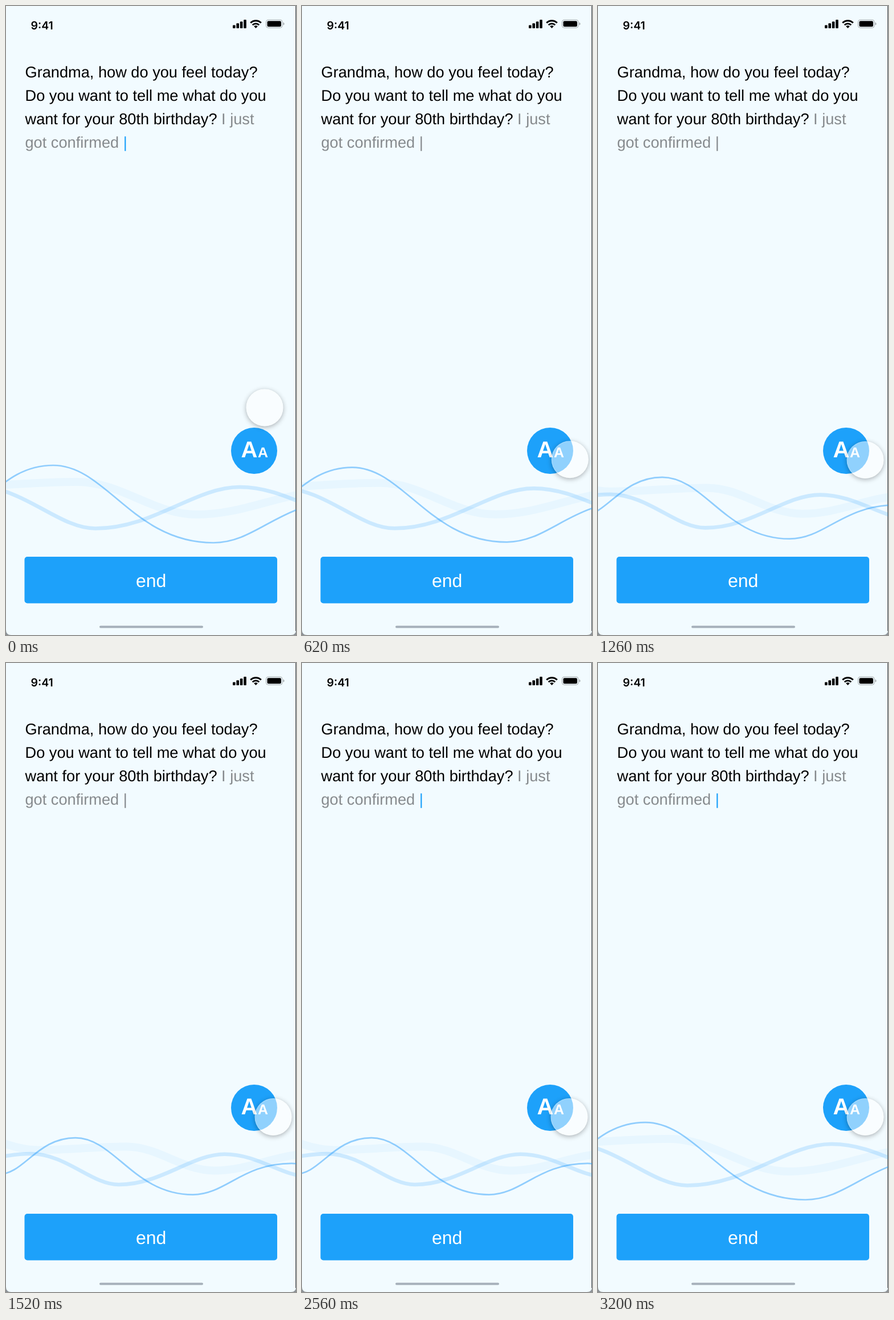
Write an HTML page that moves like this. It is 509x1101 px and loops after 3220 ms.

```html
<!DOCTYPE html>
<html lang="en">
<head>
<meta charset="utf-8">
<style>
html, body { margin: 0; width: 100%; height: 100%; overflow: hidden; background: #8b9196; }
svg { position: absolute; left: 0; top: 0; display: block; text-rendering: geometricPrecision; }
text { font-family: "Liberation Sans", Arial, sans-serif; }
#copy { font-size: 27.2px; }
.soft { fill: #868a8d; }
#clock { font: 600 19.5px Inter, sans-serif; }
#size { font-weight: 700; fill: #fff; text-anchor: middle; }
#waves path { fill: none; stroke: #1e96fb; vector-effect: non-scaling-stroke; }
#touch {
  position: absolute; left: -32.5px; top: -32.5px; width: 65px; height: 65px;
  box-sizing: border-box; border-radius: 50%;
  background: rgba(255,255,255,.51); border: 1px solid rgba(255,255,255,.25);
  box-shadow: 0 2px 8px rgba(0,0,0,.3);
}
</style>
</head>
<body>
<svg width="509" height="1101" viewBox="0 0 509 1101">
  <path fill="#f2fbff" d="M0 0H509V1092Q509 1101 500 1101H9Q0 1101 0 1092Z"/>
  <path fill="#4c5154" d="M508 0h1v1094h-1z"/>

  <text id="clock" x="43.5" y="41">9:41</text>
  <g id="signal"></g>
  <g fill="none" stroke="#000" stroke-width="2.8">
    <path d="M429.2 29.6a13.2 13.2 0 0 1 18.6 0"/>
    <path d="M432.7 33.3a8.2 8.2 0 0 1 11.6 0"/>
  </g>
  <path d="M438.5 39l-3.3-3.4a4.7 4.7 0 0 1 6.6 0z"/>
  <rect x="456.5" y="24.2" width="28.5" height="14" rx="3.8" fill="none" stroke="#a2a8ab"/>
  <rect x="458.5" y="26.2" width="24.5" height="10" rx="2.2"/>
  <path fill="#a2a8ab" d="M486.5 28.6q2 .8 2 2.6t-2 2.6z"/>

  <g id="copy">
    <text>Grandma, how do you feel today?</text>
    <text>Do you want to tell me what do you</text>
    <text>want for your 80th birthday? <tspan class="soft">I just</tspan></text>
    <text class="soft">got confirmed <tspan id="caret">|</tspan></text>
  </g>

  <g id="waves"></g>

  <circle cx="435.5" cy="778.5" r="40.5" fill="#1da1fa"/>
  <g id="size">
    <text x="427" y="789.7" font-size="40">A</text>
    <text x="451" y="789.7" font-size="25">A</text>
  </g>

  <rect x="32.5" y="964" width="443.5" height="81.5" rx="5" fill="#1da1fa"/>
  <text x="254.7" y="1016.5" font-size="32" fill="#fff" text-anchor="middle">end</text>
  <rect x="164" y="1084.7" width="182" height="4" rx="2" fill="#a7b1bb"/>
</svg>
<div id="touch"></div>

<script>
const LOOP = 3220;
const $ = id => document.getElementById(id);

function add(parent, tag, attrs) {
  const el = document.createElementNS("http://www.w3.org/2000/svg", tag);
  for (const name in attrs) el.setAttribute(name, attrs[name]);
  return $(parent).appendChild(el);
}

[...$("copy").children].forEach((line, i) => {
  line.setAttribute("x", 33.5);
  line.setAttribute("y", 125.3 + 40.75 * i);
});

for (let i = 0; i < 4; i++) {
  const height = 5.5 + 3.15 * i;
  add("signal", "rect", { x: 398 + 6.4 * i, y: 39 - height, width: 4.6, height, rx: 1 });
}

// A smooth line through crests and troughs; leave and reach set how long
// it stays level after and before each of them.
function curve(points, leave, reach) {
  return points.map(([x, y], i) => {
    if (!i) return `M${x} ${y}`;
    const [px, py] = points[i - 1], dx = x - px;
    return `C${px + leave * dx} ${py} ${x - reach * dx} ${y} ${x} ${y}`;
  }).join("");
}

// Each wave shrinks about its own centre.
function wave(cx, cy, width, alpha, d) {
  const el = add("waves", "path", { d, "stroke-width": width, "stroke-opacity": alpha });
  return s => el.setAttribute("transform",
    `translate(${cx * (1 - s)} ${cy * (1 - s)}) scale(${s})`);
}

const waves = [
  wave(450, 884, 14, .05,
    curve([[-260, 806], [-87, 841], [125, 833], [335, 890], [570, 850]], .37, .37)),
  wave(311, 909, 6.6, .185,
    curve([[-300, 872], [-53, 841], [157, 914.5], [410, 842], [610, 895]], .4, .31)),
  wave(229, 906, 2.7, .46,
    curve([[-100, 891], [83, 804], [364, 939.5], [600, 865], [760, 925]], .33, .5))
];

const ease = (t, from, to) => {
  const u = Math.min(1, Math.max(0, (t - from) / (to - from)));
  return (1 - Math.cos(Math.PI * u)) / 2;
};

function draw(t) {
  const calm = ease(t, 260, 1890) - ease(t, 2370, 3220);
  waves.forEach(resize => resize(1 - .302 * calm));

  $("caret").style.fill = t >= 600 && t < 2220 ? "#868a8d" : "#1da1fa";

  const reach = ease(t, 0, 320), settle = ease(t, 320, 800);
  const x = 453.5 + 19 * reach - 4 * settle;
  const y = 702.5 + 89 * reach + 2.5 * settle;
  $("touch").style.transform = `translate(${x}px, ${y}px)`;
}

const start = performance.now();
function tick() {
  draw((performance.now() - start) % LOOP);
  requestAnimationFrame(tick);
}
tick();
</script>
</body>
</html>
```
